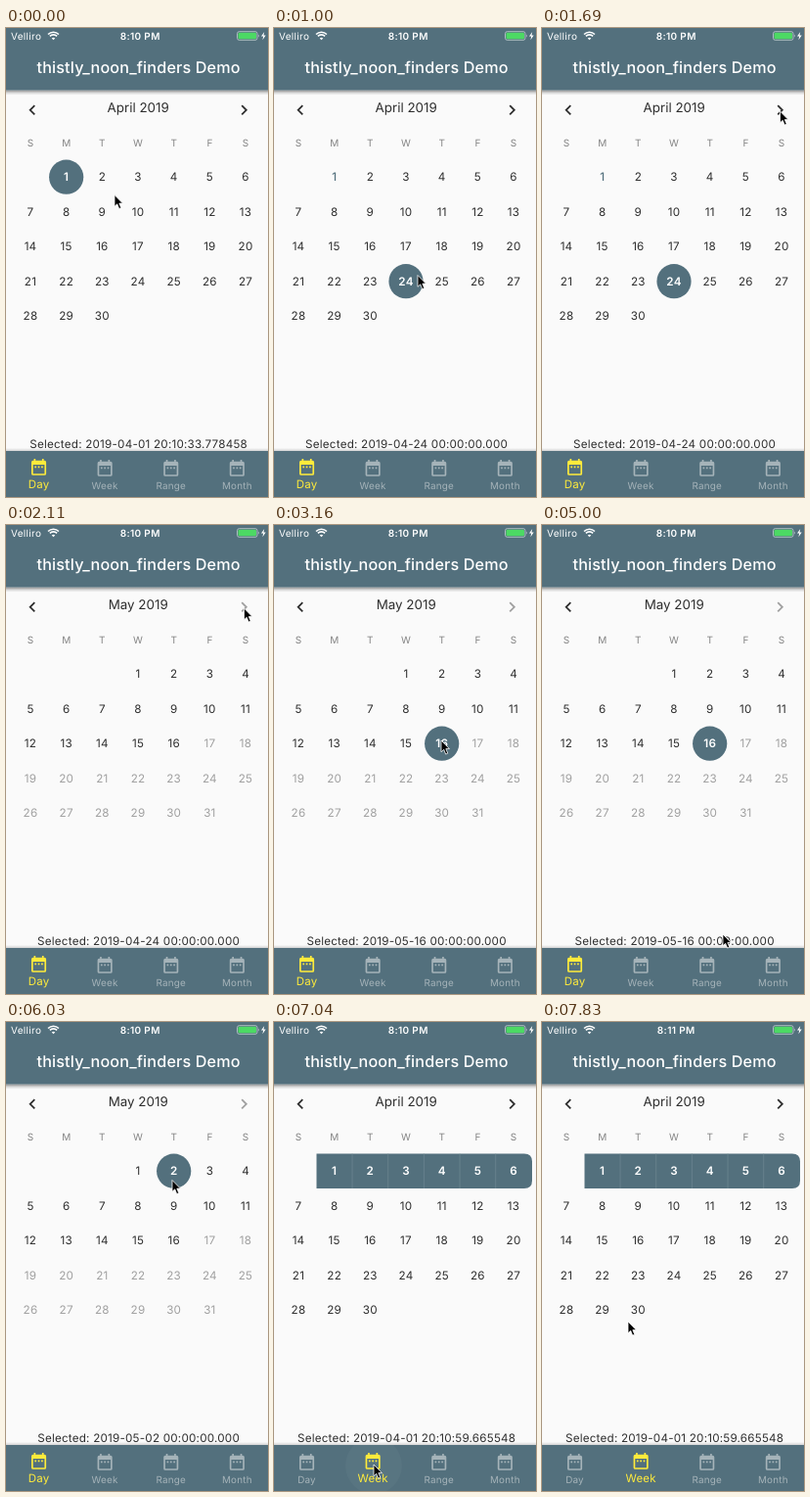
An HTML page that plays this animation: 268 by 479 pixels, repeating every 8 s.

```html
<!DOCTYPE html>
<html lang="en">
<head>
<meta charset="utf-8">
<style>
  html, body { margin: 0; height: 100%; overflow: hidden; background: #fafafa; }
  svg { display: block; width: 100vw; height: 100vh; font-family: Inter, "Open Sans", sans-serif; }
  text { text-rendering: geometricPrecision; }
</style>
</head>
<body>
<svg id="stage" viewBox="0 0 268 479">
  <defs>
    <linearGradient id="shadow" x2="0" y2="1">
      <stop stop-color="#000" stop-opacity=".42"/>
      <stop offset=".5" stop-color="#000" stop-opacity=".14"/>
      <stop offset="1" stop-color="#000" stop-opacity="0"/>
    </linearGradient>
    <linearGradient id="lift" x2="0" y2="1">
      <stop stop-color="#000" stop-opacity="0"/>
      <stop offset="1" stop-color="#000" stop-opacity=".16"/>
    </linearGradient>
    <clipPath id="navClip"><path d="M0 432h268v47H0z"/></clipPath>
    <path id="calendar" transform="scale(.8375)" fill-rule="evenodd"
      d="M5 4H6V2H8V4H16V2H18V4H19Q21 4 21 6V20Q21 22 19 22H5Q3 22 3 20V6Q3 4 5 4ZM5 9V20H19V9ZM7 11H9V13H7ZM11 11H13V13H11ZM15 11H17V13H15Z"/>
  </defs>
  <g id="scene"></g>
</svg>
<script>
const LOOP = 8000;
const BAR = '#53707d', INK = '#2e2e2e', FADED = '#a0a0a0', IDLE = '#a5b3b9', ACTIVE = '#ffeb3b';
const CELL = 36.67, ROW = 35.5;

// Pointer moves: first step time, last step time, steps, destination
const START = [111, 170.5];
const MOVES = [
  [100, 700, 5, 147, 252.5],
  [1350, 1690, 3, 243.5, 85],
  [2550, 2870, 3, 171, 220],
  [3840, 4180, 3, 114, 412.5],
  [4350, 5000, 5, 185, 418],
  [5350, 5690, 3, 170, 161.5],
  [6550, 6890, 3, 102, 452],
  [7660, 7830, 2, 88, 306],
];
const SLIDE = 1980, MAY = 2110, WEEK = 6890, MINUTE = 7660;

// Start time, selected day, label
const PICKS = [
  [0, 1, '2019-04-01 20:10:33.778458'],
  [850, 24, '2019-04-24 00:00:00.000'],
  [3160, 16, '2019-05-16 00:00:00.000'],
  [5860, 2, '2019-05-02 00:00:00.000'],
  [WEEK, 1, '2019-04-01 20:10:59.665548'],
];

const text = (str, x, y, size, fill, { weight = 400, anchor = 'middle', spacing = 0 } = {}) =>
  `<text x="${x}" y="${y}" font-size="${size}" fill="${fill}" font-weight="${weight}" ` +
  `text-anchor="${anchor}" letter-spacing="${spacing}">${str}</text>`;

const path = (d, attrs) => `<path d="${d}" ${attrs}/>`;

function pointerAt(t) {
  let [x, y] = START;
  for (const [from, to, steps, tx, ty] of MOVES) {
    if (t < from) break;
    const step = Math.min(steps, 1 + Math.floor((t - from) / (to - from) * (steps - 1) + 1e-6));
    const p = step / steps, eased = p * p * (3 - 2 * p);
    x += (tx - x) * eased;
    y += (ty - y) * eased;
  }
  return [x, y];
}

function statusBar(t) {
  const wifi = [2.4, 5, 7.6].map((r, i) => {
    const d = r * .72;
    return i ? path(`M${48.5 - d} ${12 - d}A${r} ${r} 0 0 1 ${48.5 + d} ${12 - d}`,
                    'fill="none" stroke="#fff" stroke-width="1.6"')
             : path(`M48.5 12.3l${-d} ${-d}a${r} ${r} 0 0 1 ${2 * d} 0z`, 'fill="#fff"');
  }).join('');
  return text('Velliro', 5, 11.5, 10, '#fff', { anchor: 'start', spacing: .3 }) + wifi +
    text(t < MINUTE ? '8:10 PM' : '8:11 PM', 137.2, 11.5, 10, '#fff', { weight: 600, spacing: .35 }) +
    `<rect x="236.5" y="3.7" width="20.5" height="8.6" rx="2" fill="none" stroke="#c5d0d4" stroke-width=".8"/>
     <rect x="237.5" y="4.7" width="18.5" height="6.6" rx="1.2" fill="#4cd964"/>` +
    path('M258 6.5q1.6 1.5 0 3z', 'fill="#c5d0d4"') +
    path('M264.2 4l-3.2 4.6h2.2l-.8 3.6 3.3-4.8h-2.2z', 'fill="#fff"');
}

const header = t =>
  `<rect y="63.6" width="268" height="5" fill="url(#shadow)"/><rect width="268" height="63.6" fill="${BAR}"/>` +
  statusBar(t) + text('thistly_noon_finders Demo', 135.6, 46, 16.2, '#fff', { weight: 550, spacing: .15 });

// firstColumn is the weekday of day 1, lastOpen the last selectable day
function month(title, firstColumn, days, lastOpen, selected, weekMode) {
  let out = text(title, 135.2, 86, 13.4, INK);
  [...'SMTWTFS'].forEach((c, i) => out += text(c, 25 + i * CELL, 120.5, 10, '#848484'));
  if (weekMode) {
    out += path('M43.5 134.5H256q8 0 8 8v19.5q0 8 -8 8H43.5z', `fill="${BAR}"`);
    for (let i = 2; i < 7; i++)
      out += path(`M${6.7 + i * CELL} 134.5v35.5`, 'stroke="#768d97" stroke-width=".6"');
  }
  for (let day = 1; day <= days; day++) {
    const slot = day + firstColumn - 1;
    const x = 25 + slot % 7 * CELL, y = 152.2 + Math.floor(slot / 7) * ROW;
    const on = weekMode ? slot < 7 : day === selected;
    const today = title[0] === 'A' && day === 1;
    if (on && !weekMode) out += `<circle cx="${x}" cy="${y}" r="17.6" fill="${BAR}"/>`;
    const fill = on ? '#fff' : day > lastOpen ? FADED : today ? BAR : INK;
    out += text(day, x, y + 4.2, 11.7, fill, { weight: on ? 600 : today ? 500 : 400, spacing: .2 });
  }
  return out;
}

function calendar(t, selected) {
  const weekMode = t >= WEEK;
  const april = t < 3160 || weekMode;
  const shift = weekMode || t < SLIDE ? 0 : t < MAY ? .5 : 1;
  const page = (index, body) => `<g transform="translate(${(index - shift) * 268} 0)">${body}</g>`;
  let out = '';
  if (shift < 1) out += page(0, month('April 2019', 1, 30, 30, selected, weekMode));
  if (shift > 0) out += page(1, month('May 2019', 3, 31, 16, april ? 0 : selected, false));
  return out +
    path('M29.3 79.2l-4.6 4.6 4.6 4.6', `fill="none" stroke="${INK}" stroke-width="1.8"`) +
    path('M241.2 79.2l4.6 4.6 -4.6 4.6', `fill="none" stroke="${shift < 1 ? INK : FADED}" stroke-width="1.8"`);
}

function navigation(t) {
  const current = t < WEEK ? 0 : 1;
  let out = `<rect y="429" width="268" height="3" fill="url(#lift)"/><rect y="432" width="268" height="47" fill="${BAR}"/>`;
  const ripple = Math.max(0, 1 - Math.max(0, t - 7190) / 290);
  if (t >= WEEK && ripple)
    out += `<circle cx="102" cy="453" r="${t < 7040 ? 18 : 29}" fill="#fff" opacity="${.03 * ripple}" clip-path="url(#navClip)"/>`;
  ['Day', 'Week', 'Range', 'Month'].forEach((name, i) => {
    const on = i === current, x = 33.5 + i * 67.6, fill = on ? ACTIVE : IDLE;
    out += `<use href="#calendar" x="${x - 10}" y="${on ? 438.4 : 439.4}" fill="${fill}"/>` +
      text(name, x, on ? 470.3 : 470.7, on ? 11.5 : 9.9, fill, { spacing: .2 });
  });
  return out;
}

function render(t) {
  const [, selected, label] = PICKS.findLast(([start]) => t >= start);
  const [x, y] = pointerAt(t);
  return calendar(t, selected) + header(t) +
    text('Selected: ' + label, 135.6, 429, 11.7, INK, { spacing: .2 }) + navigation(t) +
    path('M0 0V13.4L3.1 10.6 5.3 16 7.7 15 5.5 9.8H9.6Z',
      `transform="translate(${x} ${y}) scale(.88)" fill="#000" stroke="#fff" stroke-width=".9" stroke-linejoin="round"`);
}

const scene = document.getElementById('scene');
let shown = '';
function frame() {
  const markup = render(performance.now() % LOOP);
  if (markup !== shown) scene.innerHTML = shown = markup;
  requestAnimationFrame(frame);
}
frame();
</script>
</body>
</html>
```
